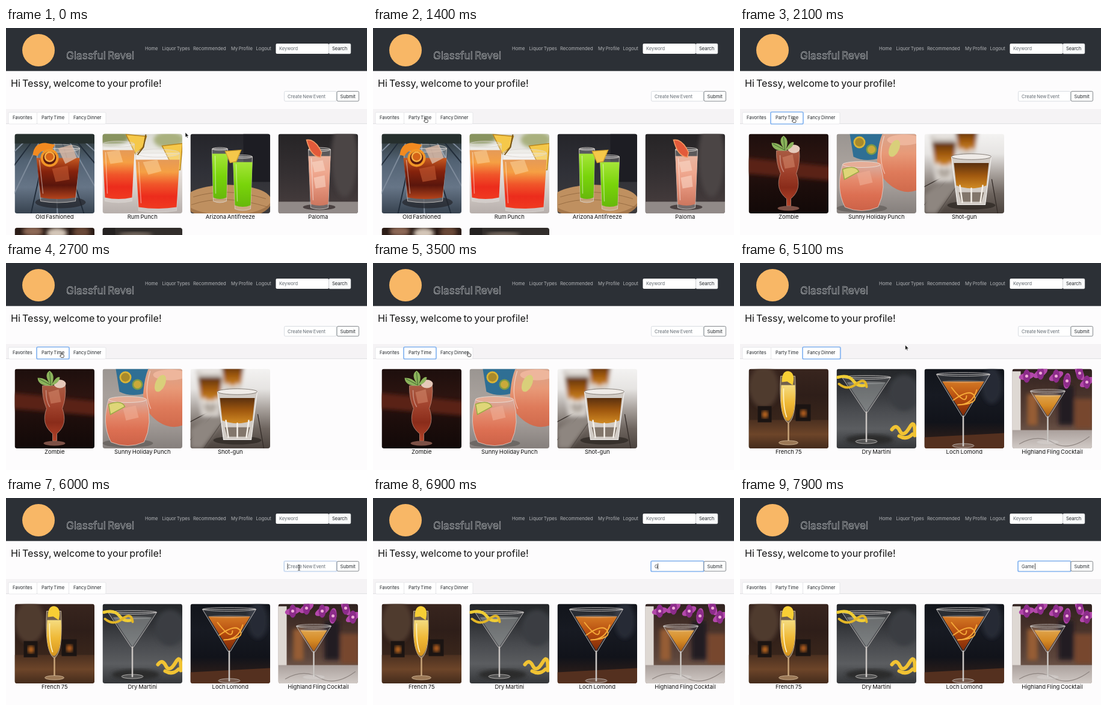
An HTML page for the animation above (8 s loop, 600 px wide and 345 px high).

```html
<!DOCTYPE html>
<html lang="en">
<head>
<meta charset="utf-8">
<title>Drinks profile</title>
<style>
html, body { margin: 0; width: 100%; height: 100%; overflow: hidden; background: #fdfcfd; }
svg { display: block; width: 600px; height: 345px; }
text { font-family: Inter, "Open Sans", sans-serif; fill: #212529; white-space: pre; word-spacing: -.1em; }
.nav text { font-size: 7.7px; fill: #b3b5b8; }
.tab text { font-size: 7.6px; }
.tab rect { fill: #fff; stroke: #e2e3e6; stroke-width: .8; }
.cap { font-size: 9.5px; text-anchor: middle; fill: #111; }
.ring { fill: none; stroke: #86b6f2; stroke-width: 1.7; }
</style>
</head>
<body>
<svg viewBox="0 0 600 345">
  <defs>
    <clipPath id="card"><rect width="132.5" height="132.5" rx="4"/></clipPath>
    <filter id="soft"><feGaussianBlur stdDeviation="3"/></filter>
  </defs>
  <rect width="600" height="345" fill="#fdfcfd"/>
  <rect width="600" height="71.7" fill="#2c3036"/>
  <circle cx="54" cy="37" r="27" fill="#f8b766"/>
  <text x="100" y="51.5" font-size="17.3" style="fill:none;stroke:#e4e6e8;stroke-width:.45">Glassful Revel</text>
  <g class="nav">
    <text x="231" y="37">Home</text><text x="259.5" y="37">Liquor Types</text>
    <text x="311" y="37">Recommended</text><text x="374" y="37">My Profile</text>
    <text x="415.5" y="37">Logout</text>
  </g>
  <rect x="448.5" y="26" width="88" height="17" rx="2" fill="#fff"/>
  <rect x="536.5" y="26" width="36.5" height="17" rx="2" fill="#f8f9fa" stroke="#d4d7da" stroke-width=".5"/>
  <text x="454" y="37.3" font-size="7.5" style="fill:#5d646b">Keyword</text>
  <text x="542" y="37.3" font-size="7.6">Search</text>

  <text x="8" y="98" font-size="16.2" style="fill:#111">Hi Tessy, welcome to your profile!</text>
  <rect id="input" x="462.5" y="105.5" width="87" height="16.5" rx="2" fill="#fff" stroke="#ced4da" stroke-width=".8"/>
  <rect id="inputRing" class="ring" x="462" y="105" width="88" height="17.5" rx="2"/>
  <rect x="550" y="105.5" width="36.5" height="16.5" rx="2" fill="#fff" stroke="#50565c" stroke-width=".7"/>
  <text x="555.5" y="116.5" font-size="7.7">Submit</text>
  <text id="typed" x="468" y="116.5" font-size="7.6"></text>
  <rect id="caret" y="109" width=".8" height="10" fill="#222"/>

  <rect y="135" width="600" height="25" fill="#f5f3f5"/>
  <path d="M0 159.5H600" stroke="#dfe0e3"/>
  <g class="tab">
    <rect x="4" y="140.5" width="47.5" height="19.5" rx="2"/>
    <rect x="51.5" y="140.5" width="53" height="19.5" rx="2"/>
    <rect x="104.5" y="140.5" width="61.5" height="19.5" rx="2"/>
    <text x="11" y="152.3">Favorites</text><text x="59" y="152.3">Party Time</text>
    <text x="112" y="152.3">Fancy Dinner</text>
  </g>
  <rect id="tabRing" class="ring" y="140" height="20" rx="2"/>

  <g id="views"></g>
  <g id="cursor" stroke-linejoin="round">
    <path d="M0 0V8.2L1.9 6.5 3.2 9.3 4.5 8.7 3.2 6H5.8Z" fill="#111" stroke="#fff" stroke-width=".6"/>
    <path transform="scale(.84)" d="M-.9 .8Q0 -.6 .9 .8V3.4Q2 2.8 2.6 3.8 3.9 3.5 4.2 4.5 5.2 4.4 5.2 5.6 5.2 8.2 4.2 9.6H-.4L-3 6.4Q-2.6 5.1 -.9 6.2Z" fill="#fff" stroke="#111" stroke-width=".9"/>
    <path d="M-1.8 -4.5Q0 -4.5 0 -3.2 0 -4.5 1.8 -4.5M0 -3.2V3.6M-1.8 4.7Q0 4.7 0 3.4 0 4.7 1.8 4.7M-1.2 .9H1.2" fill="none" stroke="#222" stroke-width=".8"/>
  </g>
</svg>
<script>
const $ = id => document.getElementById(id);
const defs = document.querySelector('defs');
let gradients = 0;

// Vertical gradient through the given colours
function grad(...colors) {
  const id = 'g' + gradients++;
  const stops = colors.map((c, i) => `<stop offset="${i / (colors.length - 1)}" stop-color="${c}"/>`);
  defs.insertAdjacentHTML('beforeend', `<linearGradient id="${id}" x2="0" y2="1">${stops.join('')}</linearGradient>`);
  return `url(#${id})`;
}
const shape = (d, fill, more = '') => `<path d="${d}" fill="${fill}" ${more}/>`;
const line = (d, color, w = 1) => shape(d, 'none', `stroke="${color}" stroke-width="${w}" stroke-linecap="round"`);
const oval = (x, y, rx, ry, fill, more = '') => `<ellipse cx="${x}" cy="${y}" rx="${rx}" ry="${ry}" fill="${fill}" ${more}/>`;
const box = (x, y, w, h, fill, more = '') => `<rect x="${x}" y="${y}" width="${w}" height="${h}" fill="${fill}" ${more}/>`;
const back = (...colors) => box(0, 0, 133, 133, grad(...colors));
const blur = parts => `<g filter="url(#soft)">${parts}</g>`;
const glow = (x, y, rx, ry, fill) => blur(oval(x, y, rx, ry, fill));

// Straight glass: rim, tapered body, filled from level down
function tumbler(x, y, w, h, level, fill, taper = 4, rim = '#d9d4cf') {
  const side = (top, bottom) => `M${x} ${top}H${x + w}L${x + w - taper} ${bottom}Q${x + w / 2} ${bottom + 5} ${x + taper} ${bottom}Z`;
  return shape(side(y, y + h), '#ffffff38', `stroke="${rim}" stroke-width=".8"`) +
    shape(side(level, y + h - 6), fill) + oval(x + w / 2, y, w / 2, w / 11, '#ffffff30', `stroke="${rim}" stroke-width=".8"`) +
    line(`M${x + 5} ${level + 4}L${x + 4 + taper} ${y + h - 13}`, '#ffffff70', 1.4);
}
// V-shaped glass on a stem
function martini(x, y, w, h, level, fill, base) {
  const m = x + w / 2, k = (level - y) / h * w / 2;
  return shape(`M${x} ${y}H${x + w}L${m + 2} ${y + h}H${m - 2}Z`, '#ffffff18', 'stroke="#c8c5c2" stroke-width=".9"') +
    shape(`M${x + k + 2} ${level}H${x + w - k - 2}L${m} ${y + h - 1}Z`, fill) +
    oval(m, level, w / 2 - k - 2, 2.5, '#ffffff30') +
    oval(m, y, w / 2, 3, 'none', 'stroke="#d8d5d2" stroke-width=".8"') +
    line(`M${m} ${y + h}V${base}`, '#bdb9b5', 2.6) + line(`M${m} ${y + h}V${base}`, '#f5f0ec90', .8) +
    oval(m, base, 18, 3.5, '#ffffff30', 'stroke="#c8c5c2" stroke-width=".8"');
}
const wedge = (d, rind = '#b9851c') => shape(d, '#f5c84a', `stroke="${rind}" stroke-width="1.5"`);
const slice = (x, y, r, rind, flesh) => oval(x, y, r, r, rind) + oval(x, y, r * .72, r * .72, flesh);

const oldFashioned = () => {
  let planks = '';
  for (let i = 0; i < 9; i++) planks += line(`M${i * 13 + 14} 15L${i * 44 - 105} 133`, i % 2 ? '#222d3a' : '#7d8a9a', 2);
  return back('#26302f', '#526273', '#667587', '#37424f') + planks + box(0, 0, 133, 16, '#262f2d') +
    oval(76, 114, 42, 10, '#24262b', 'opacity=".7"') +
    tumbler(36, 24, 72, 88, 40, grad('#c65a22', '#85220c', '#5a160c', '#b5441c'), 7) +
    shape('M72 24L95 18 103 40 84 50Z', '#dcb9a4', 'opacity=".8"') + shape('M62 58L88 53 91 76 68 80Z', '#c35b32', 'opacity=".6"') +
    shape('M30 35Q32 15 51 15L67 18 59 31Q45 23 38 37Z', '#f28a20') +
    slice(58, 40, 15, '#f29526', '#5f1c0e') + slice(58, 38, 9, '#f8b147', '#d56418');
};
const rumPunch = () => {
  const punch = () => grad('#e59a58', '#f5a044', '#f0562a', '#ec2c1c', '#f03a20');
  return back('#d8d9d2', '#f2efec', '#d7d0cb', '#b6aeab') + glow(15, 5, 30, 14, '#88935e') + glow(110, 10, 25, 14, '#a9b07e') +
    wedge('M39 1L73 4 67 22 55 34Z') + tumbler(0, 17, 53, 95, 27, punch(), 4) +
    wedge('M99 20L133 16 129 60 119 60Z') + tumbler(55, 32, 73, 96, 43, punch(), 5) +
    shape('M7 30L28 27 34 47 13 50ZM67 47L91 43 98 62 76 68Z', '#fbd29a', 'opacity=".55"') +
    shape('M72 1L68 22 58 35', 'none', 'stroke="#785516" stroke-width="2"');
};
const antifreeze = () => {
  const green = () => grad('#a6e639', '#79d40a', '#66b80b');
  return back('#25252a', '#303138', '#3e3c3d') + box(88, 0, 45, 80, '#1d1d23') + oval(62, 114, 72, 29, '#a3764b') +
    oval(62, 110, 72, 25, '#bf9060') + line('M5 105Q60 88 125 108M2 118Q55 99 129 122', '#986d43', 1) +
    tumbler(36, 25, 26, 87, 33, green(), 2) + tumbler(71, 38, 32, 87, 47, green(), 3) +
    wedge('M58 29L84 27 76 46 66 48Z', '#d3a42d');
};
const paloma = () => back('#262426', '#353032', '#493f3f') + glow(110, 40, 22, 65, '#4b4545') + box(0, 113, 133, 20, '#918a88') +
  oval(68, 122, 27, 5, '#4a4141') + tumbler(50, 26, 37, 97, 37, grad('#e9b5a0', '#efa88f', '#e19078', '#cc765e'), 4) +
  shape('M47 10Q62 8 72 31L70 39Q54 38 47 10Z', '#e35a3a', 'stroke="#f29a64" stroke-width="1.6"') +
  shape('M56 47L74 44 78 61 60 64ZM59 73L77 69 79 88 62 91Z', '#fbdacb', 'opacity=".55"');
const zombie = () => back('#1d0f0d', '#2c1410', '#1c0d0b', '#120908') + blur(shape('M-5 40L138 54V78L-5 66Z', '#5a2015')) +
  shape('M46 28H84Q86 47 79 66 89 92 70 108V120H63V108Q43 92 53 66 45 47 46 28Z', grad('#a85a42', '#a3452f', '#8a2c1a', '#b4442a'), 'stroke="#c69a88" stroke-width=".7"') +
  oval(66, 124, 18, 4, '#7d5146') + shape('M56 39L73 34 77 55 60 58Z', '#d98d71', 'opacity=".5"') + line('M52 36Q52 54 58 63', '#ffffff60', 1.4) +
  oval(75, 25, 10, 7, '#e5c9ba') + shape('M60 28Q39 29 38 15 50 14 58 24 48 9 58 3 68 10 62 25 70 11 75 14 74 24 60 28Z', '#8cb35c') + line('M41 17L60 27 58 6', '#3b6628', 1);
const holidayPunch = () => back('#9a9591', '#a7a09b', '#a39c98', '#857f7c') + shape('M22 0H78L72 40Q48 48 28 38Z', '#2f6f94') +
  slice(38, 14, 10, '#d9b437', '#a98a2a') + slice(58, 26, 9, '#7b9a48', '#c9aa3a') +
  shape('M76 0H133V94Q112 102 90 86 64 66 68 36 70 14 76 0Z', grad('#d8a58d', '#e89a78', '#de7a5a', '#d06a4c')) +
  oval(112, 10, 28, 9, '#eeb69c') + oval(96, 24, 8, 15, '#d9cf7a', 'transform="rotate(24 96 24)"') + line('M79 4Q68 40 80 66', '#ffffff70', 1.4) +
  oval(42, 124, 42, 7, '#5b5553', 'opacity=".6"') +
  shape('M10 51H73Q84 91 69 122 42 134 14 122 -2 91 10 51Z', grad('#d8ada0', '#e58a6c', '#dc6f52', '#cc6248'), 'stroke="#dfd5d0" stroke-width=".8"') +
  oval(41.5, 51, 31.5, 5, '#e5ad97', 'stroke="#eee5df" stroke-width=".8"') + shape('M34 66L55 61 60 81 39 86Z', '#f0ae94', 'opacity=".6"') +
  shape('M10 59Q32 51 37 63L13 76Z', '#dfd678', 'stroke="#9cab46" stroke-width="1.6"');
const shotGun = () => {
  const glass = (x, y, w, h) => shape(`M${x} ${y}H${x + w}L${x + w - 10} ${y + h}H${x + 10}Z`, '#d2ccc6', 'stroke="#f4f2f0" stroke-width="1.2"') +
    shape(`M${x + 4} ${y + h * .13}H${x + w - 4}L${x + w - 8} ${y + h * .6}Q${x + w / 2} ${y + h * .72} ${x + 8} ${y + h * .6}Z`, grad('#5a300f', '#a1590f', '#d08a24')) +
    shape(`M${x + 12} ${y + h * .74}H${x + w - 12}L${x + w - 16} ${y + h - 5}H${x + 16}Z`, '#82766b') +
    line(`M${x + 14} ${y + h * .6}L${x + 18} ${y + h - 4}M${x + w / 2} ${y + h * .66}V${y + h - 4}M${x + w - 14} ${y + h * .6}L${x + w - 18} ${y + h - 4}`, '#f6f1ea', 2.5) +
    oval(x + w / 2, y, w / 2, h * .06, '#efebe7', 'stroke="#6f6760" stroke-width=".8"');
  return back('#f3f2f1', '#e6e4e2', '#a8a19c', '#6d645e', '#4a423d') + line('M0 88L30 72M0 118L42 72M22 133L58 80M122 133L112 76', '#362e2a', 1.4) +
    blur(shape('M0 100L40 74 60 78 20 133H0Z', '#8e8680') + glass(9, 4, 48, 74) + glass(48, -14, 44, 64)) +
    oval(78, 119, 40, 7, '#2c2521', 'opacity=".7"') + glass(45, 38, 66, 80);
};
const french75 = () => back('#38251e', '#2e1e19', '#3a261b', '#4d311f') + glow(25, 30, 25, 35, '#503a2e') + box(0, 85, 133, 48, grad('#4b3020', '#6d4529', '#432b1c')) +
  box(15, 62, 23, 27, '#1b1412') + box(78, 59, 25, 28, '#1b1412') + glow(27, 76, 5, 6, '#dc7723') + glow(91, 74, 5, 6, '#d36e20') +
  shape('M53 12H77Q80 72 70 86L66 91 62 87Q50 72 53 12Z', '#d9c7a060', 'stroke="#dfcfae" stroke-width=".8"') +
  shape('M54 27H77Q79 72 69 84 65 89 61 84 51 72 54 27Z', grad('#f5dc80', '#efb937', '#d7951d')) +
  shape('M55 22Q55 2 67 4 78 7 73 27L64 21Z', '#f8cf35') + line('M58 33Q57 65 63 80', '#fff4c4', 1.6) +
  line('M66 90V122', '#c8a479', 2.5) + oval(66, 123, 16, 3.5, '#9b7856', 'stroke="#d8c0a0" stroke-width=".8"');
const dryMartini = () => back('#242629', '#303236', '#484a4e', '#5b5d60', '#343639') + glow(112, 40, 25, 30, '#3b3e42') + glow(55, 118, 40, 9, '#292a2c') +
  martini(9, 14, 81, 58, 23, '#bfc5c455', 121) + line('M2 14Q20 9 28 20T48 27', '#f0cd35', 5) + line('M4 25Q18 37 33 25T50 30', '#e3b627', 4) +
  line('M92 101Q99 91 105 103T121 98 130 111M104 112Q116 119 126 109', '#f1c333', 6);
const lochLomond = () => back('#12151b', '#171a22', '#11131a', '#382219') + glow(112, 28, 17, 30, '#252a35') + shape('M0 114L133 107V133H0Z', '#54301f') +
  martini(20, 9, 89, 70, 21, grad('#d47924', '#b44a0e', '#7e2a08'), 128) +
  line('M48 52Q76 32 83 45T55 60Q80 60 87 35M45 31Q69 62 70 45', '#f5a938', 2);
const highlandFling = () => back('#302220', '#4a342c', '#5c453b', '#876e60') + blur(box(77, 28, 25, 65, '#201a20') + box(104, 50, 30, 50, '#77472d') + box(25, 42, 17, 52, '#965d35')) +
  box(0, 4, 14, 110, '#ded8d3') + box(0, 102, 133, 31, grad('#aaa09c', '#d2cbc7')) + line('M12 125Q42 108 68 123T128 113', '#8e8581', 1.2) +
  [[24, 12], [47, 7], [73, 12], [91, 20], [112, 7], [124, 22]].map(([x, y]) =>
    oval(x, y, 13, 6, '#b348aa', `transform="rotate(${x * 7} ${x} ${y})"`) + oval(x, y, 6, 11, '#8d2c8b') + oval(x, y, 2.5, 2.5, '#efb0d7')).join('') +
  martini(30, 37, 58, 43, 44, grad('#dfa34a', '#d58a25', '#a95c15'), 122);
const darkDrink = () => back('#2a1b16', '#4a3027') + glow(30, 6, 17, 8, '#8e6957') + glow(70, 9, 17, 9, '#d4c6b8') + glow(111, 7, 14, 9, '#6b4938');
const greyDrink = () => back('#302c2a', '#514642') + glow(55, 12, 28, 5, '#776b61') + box(0, 0, 21, 14, '#242120');

const menus = [
  [['Old Fashioned', oldFashioned], ['Rum Punch', rumPunch], ['Arizona Antifreeze', antifreeze], ['Paloma', paloma], ['', darkDrink], ['', greyDrink]],
  [['Zombie', zombie], ['Sunny Holiday Punch', holidayPunch], ['Shot-gun', shotGun]],
  [['French 75', french75], ['Dry Martini', dryMartini], ['Loch Lomond', lochLomond], ['Highland Fling Cocktail', highlandFling]]
];
$('views').innerHTML = menus.map(menu => '<g>' + menu.map(([name, draw], i) => {
  const x = 14.5 + i % 4 * 146, y = i < 4 ? 176.5 : 333;
  return `<g transform="translate(${x} ${y})"><g clip-path="url(#card)">${draw()}</g><text class="cap" x="66.3" y="141">${name}</text></g>`;
}).join('') + '</g>').join('');

const LOOP = 8000, FADE = 150, FOCUS = 5950;
const switches = [-1000, 1800, 3800, 1e5];
const keys = [6900, 7100, 7300, 7500, 7700];
const path = [[0, 298, 174], [200, 298, 174], [1200, 87, 149.5], [1900, 87, 149.5], [2400, 92, 149.5], [2800, 92, 149.5],
  [3400, 158.5, 148], [4700, 158.5, 148], [5700, 487, 116], [LOOP, 487, 116]];
const clamp = v => Math.max(0, Math.min(1, v));

function pointer(t) {
  const i = path.findIndex(p => p[0] > t);
  const [t0, x0, y0] = path[i - 1], [t1, x1, y1] = path[i];
  const u = (t - t0) / (t1 - t0), e = u * u * (3 - 2 * u);
  return [x0 + (x1 - x0) * e, y0 + (y1 - y0) * e];
}

function render(t) {
  // Old view fades out before the new one fades in
  [...$('views').children].forEach((view, i) => {
    const o = Math.min(clamp((t - switches[i] - FADE) / FADE), 1 - clamp((t - switches[i + 1]) / FADE));
    view.setAttribute('opacity', o);
    view.style.display = o ? '' : 'none';
  });

  const dinner = t >= switches[2];
  $('tabRing').setAttribute('x', dinner ? 104 : 51);
  $('tabRing').setAttribute('width', dinner ? 63 : 54);
  $('tabRing').setAttribute('opacity', t >= switches[1] && t < FOCUS ? 1 : 0);

  const count = keys.filter(k => t >= k).length;
  $('typed').textContent = count ? 'Game '.slice(0, count) : 'Create New Event';
  $('typed').style.fill = count ? '#343a40' : '#626a72';
  $('inputRing').setAttribute('opacity', clamp((t - FOCUS) / FADE));
  const lastInput = count ? keys[count - 1] : FOCUS;
  $('caret').setAttribute('x', 467.6 + (count ? $('typed').getComputedTextLength() : 0));
  $('caret').setAttribute('opacity', t >= FOCUS && (t - lastInput) % 1000 < 500 ? 1 : 0);

  const [x, y] = pointer(t);
  const overTab = x > 4 && x < 166 && y > 140 && y < 160;
  const overInput = x > 462 && x < 550 && y > 105 && y < 122;
  const kind = overTab ? 1 : overInput ? 2 : 0;
  $('cursor').setAttribute('transform', `translate(${x} ${y})`);
  [...$('cursor').children].forEach((c, i) => c.style.display = i === kind && !count ? '' : 'none');
}

const start = performance.now();
function frame() {
  render((performance.now() - start) % LOOP);
  requestAnimationFrame(frame);
}
frame();
</script>
</body>
</html>
```
